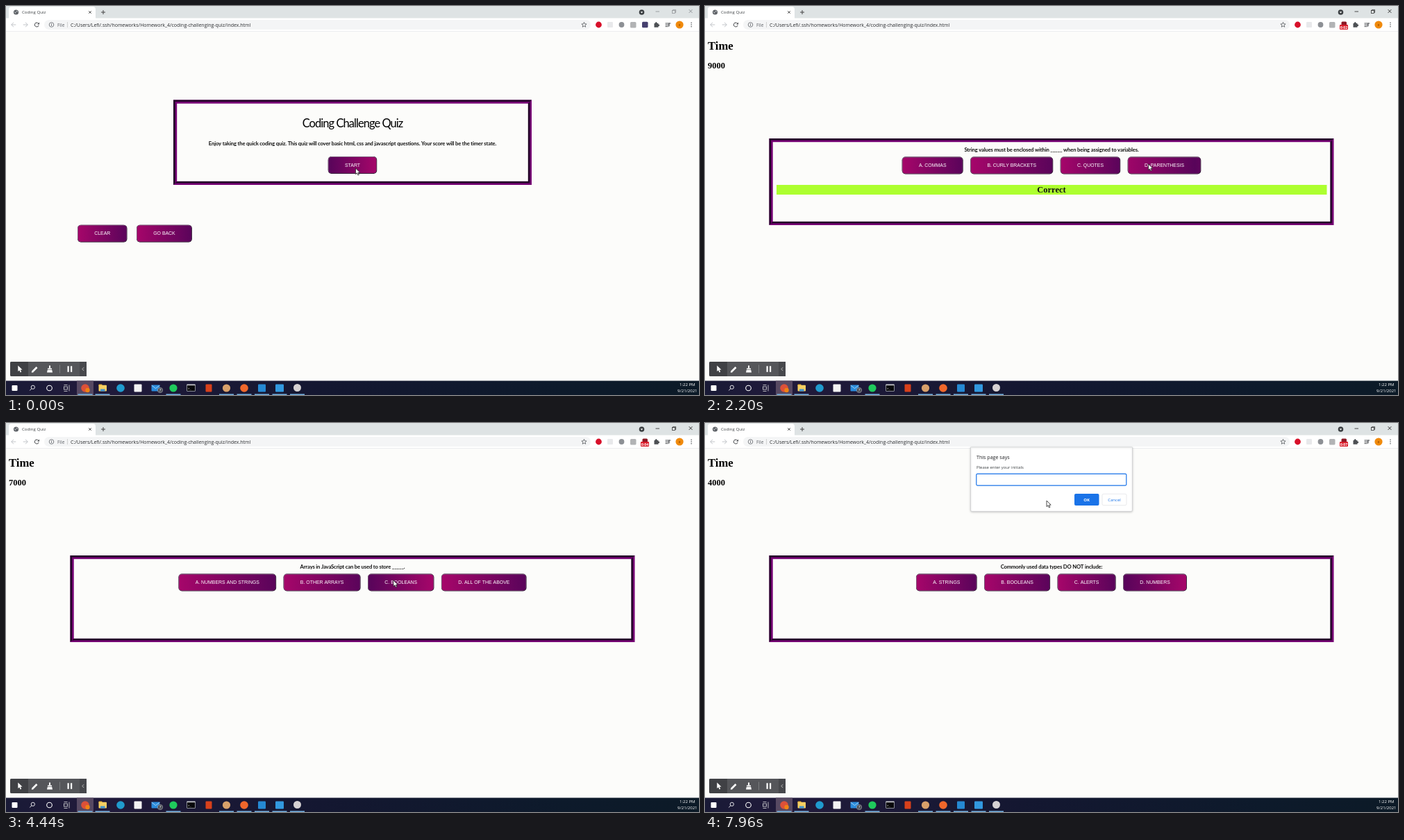
An HTML page with a canvas for the animation above (8000 ms loop, 998 px wide and 561 px high).

```html
<!DOCTYPE html>
<html lang="en">
<head>
<meta charset="utf-8">
<title>Coding Quiz</title>
<style>
html, body { margin: 0; width: 100%; height: 100%; overflow: hidden; background: #fcfcfa; }
canvas { display: block; }
</style>
</head>
<body>
<canvas id="stage" width="998" height="561"></canvas>
<script>
const ctx = document.getElementById('stage').getContext('2d');
const LOOP = 8000, PAGE = '#fcfcfa', MAGENTA = '#a6066a', PLUM = '#58045a';
const UI = '"Open Sans", sans-serif', SERIF = '"Liberation Serif", serif';
const BUTTON_FONT = '6.93px "Liberation Sans", sans-serif';
const START = 780, PROMPT = 7360, FOCUS = 160;

const screens = [
  { from: -1000 },
  { from: START, ask: 'Inside which HTML element do we put the JavaScript?',
    options: ['A. <JS>', 'B. <JAVASCRIPT>', 'C. <SCRIPTING>', 'D. <SCRIPT>'] },
  { from: 2100, ask: 'String values must be enclosed within _____ when being assigned to variables.',
    options: ['A. COMMAS', 'B. CURLY BRACKETS', 'C. QUOTES', 'D. PARENTHESIS'], correct: true },
  { from: 3880, ask: 'Arrays in JavaScript can be used to store _____.',
    options: ['A. NUMBERS AND STRINGS', 'B. OTHER ARRAYS', 'C. BOOLEANS', 'D. ALL OF THE ABOVE'] },
  { from: 6600, ask: 'Commonly used data types DO NOT include:',
    options: ['A. STRINGS', 'B. BOOLEANS', 'C. ALERTS', 'D. NUMBERS'] }
];

// Pointer stops: time, x, y
const path = [
  [0, 503.5, 234], [960, 503.5, 234], [1560, 640, 229], [1800, 638.5, 228],
  [2320, 638.5, 228], [2950, 470, 230], [3200, 462, 231], [3500, 462, 231],
  [3800, 556, 229], [4000, 558, 227], [4600, 558, 227], [5200, 470, 230],
  [5600, 485, 230], [6300, 640, 232], [6500, 630.5, 231], [7400, 630.5, 231],
  [7860, 492, 112], [LOOP, 492, 112]
];

const smooth = k => k * k * (3 - 2 * k);

function pointer(t) {
  const i = path.findIndex(p => p[0] > t);
  if (t < 0) return path[0].slice(1);
  if (i < 0) return path[path.length - 1].slice(1);
  const [t0, x0, y0] = path[i - 1], [t1, x1, y1] = path[i];
  const k = smooth((t - t0) / (t1 - t0));
  return [x0 + (x1 - x0) * k, y0 + (y1 - y0) * k];
}

function rect(x, y, w, h, fill) {
  ctx.fillStyle = fill;
  ctx.fillRect(x, y, w, h);
}

function round(x, y, w, h, r, fill, line, lw = 1) {
  ctx.beginPath();
  ctx.roundRect(x, y, w, h, r);
  if (fill) { ctx.fillStyle = fill; ctx.fill(); }
  if (line) { ctx.strokeStyle = line; ctx.lineWidth = lw; ctx.stroke(); }
}

function disc(x, y, r, fill, line, lw = 1) {
  round(x - r, y - r, 2 * r, 2 * r, r, fill, line, lw);
}

function shape(points, fill, line, lw = 1) {
  ctx.beginPath();
  for (let i = 0; i < points.length; i += 2) ctx.lineTo(points[i], points[i + 1]);
  if (fill) { ctx.closePath(); ctx.fillStyle = fill; ctx.fill(); }
  if (line) { ctx.strokeStyle = line; ctx.lineWidth = lw; ctx.stroke(); }
}

function text(str, x, y, font, color, align = 'left', spacing = 0) {
  ctx.font = font;
  ctx.letterSpacing = spacing + 'px';
  ctx.textAlign = align;
  ctx.fillStyle = color;
  ctx.fillText(str, x, y);
  ctx.letterSpacing = '0px';
}

function bevel(x, y, w, h, b, topLeft, bottomRight) {
  rect(x, y, w, h, bottomRight);
  shape([x, y, x + w, y, x + w - b, y + b, x + b, y + h - b, x, y + h], topLeft);
}

function groove(x, y, w, h) {
  const b = 2.6, dark = '#220427', light = '#750073';
  bevel(x, y, w, h, b, dark, light);
  bevel(x + b, y + b, w - 2 * b, h - 2 * b, b, light, dark);
  rect(x + 2 * b, y + 2 * b, w - 4 * b, h - 4 * b, PAGE);
}

function layout(screen) {
  const box = (label, x, y) => ({ label, x, y, w: ctx.measureText(label).width + 48.4, h: 25 });
  ctx.font = BUTTON_FONT;
  if (!screen.options) {
    const start = box('START', 0, 217);
    start.x = 499 - start.w / 2;
    return [start, box('CLEAR', 103, 315.7), box('GO BACK', 188, 315.7)];
  }
  const row = screen.options.map(o => box(o, 0, 217.5)), gap = 10.5;
  let x = 499 - (row.reduce((sum, b) => sum + b.w, 0) + gap * (row.length - 1)) / 2;
  for (const b of row) { b.x = x; x += b.w + gap; }
  return row;
}

// Progress of the half-second hover fade, replayed from when the button appeared
function hover(b, from, t) {
  let p = 0;
  for (let u = from; u < t; u += 20) {
    const [x, y] = pointer(u);
    const inside = x > b.x && x < b.x + b.w && y > b.y && y < b.y + b.h;
    p = Math.min(1, Math.max(0, p + (inside ? 0.04 : -0.04)));
  }
  return smooth(p);
}

function button(b, p) {
  const left = b.x - b.w * p, g = ctx.createLinearGradient(left, 0, left + 2 * b.w, 0);
  g.addColorStop(0, MAGENTA);
  g.addColorStop(0.51, PLUM);
  g.addColorStop(1, MAGENTA);
  round(b.x, b.y, b.w, b.h, 5, '#241029');
  round(b.x, b.y, b.w - 0.7, b.h - 0.7, 5, '#7d5f7c');
  round(b.x + 0.9, b.y + 0.9, b.w - 1.9, b.h - 1.9, 4, g);
  text(b.label, b.x + b.w / 2, b.y + 14.7, BUTTON_FONT, '#fff', 'center');
}

function question(str, y) {
  text(str, 499, y, '700 7.7px Lato, sans-serif', '#111', 'center', -0.17);
}

function page(t) {
  const now = Math.min(t, PROMPT);
  const screen = screens.filter(s => s.from <= now).pop();
  rect(0, 36, 998, 505, PAGE);
  if (screen.ask) {
    const ticks = Math.floor((now - START) / 1000);
    text('Time', 4, 63, '700 16.64px ' + SERIF, '#000');
    text(ticks ? String(10000 - ticks * 1000) : '0', 4, 89.5, '700 12.48px ' + SERIF, '#000');
    groove(92.5, 191, 813, 125);
    question(screen.ask, 209.5);
    if (screen.correct) {
      rect(103, 258, 792.5, 14, '#adff2f');
      text('Correct', 499, 269, '700 12.48px ' + SERIF, '#111', 'center');
    }
  } else {
    groove(241, 135.5, 516, 122.5);
    text('Coding Challenge Quiz', 499, 174.5, '16.5px Lato, cursive', '#000', 'center', -0.95);
    question('Enjoy taking the quick coding quiz. This quiz will cover basic html, css and javascript questions. Your score will be the timer state.', 200.5);
  }
  for (const b of layout(screen)) button(b, hover(b, screen.from, now));
}

function browser(t) {
  const grey = '#5f6368', control = t < FOCUS ? '#8a8d91' : '#222';
  rect(0, 0, 998, 18, '#dee3e4');
  round(4, 1, 125, 20, [4, 4, 0, 0], '#fff');
  rect(0, 17.5, 998, 18.5, '#fff');
  rect(0, 36, 998, 0.6, '#e3e5e8');
  disc(14.5, 9, 3.6, grey);
  shape([12, 8, 14, 9, 13.5, 11], '#dfe1e4');
  shape([15, 6.5, 17, 8, 15.5, 9], '#dfe1e4');
  text('Coding Quiz', 23, 11.2, '6.1px ' + UI, '#3c4043');
  cross(121, 9, 1.8, '#444');
  shape([137, 9, 143, 9], null, '#444');
  shape([140, 6, 140, 12], null, '#444');
  disc(915.5, 9, 3.8, '#3c4043');
  shape([913.7, 8.2, 917.3, 8.2, 915.5, 10.5], '#fff');
  shape([935.5, 8, 941, 8], null, control, 0.8);
  ctx.strokeStyle = control;
  ctx.lineWidth = 0.7;
  ctx.strokeRect(959.5, 6.5, 4, 4);
  shape([960.5, 6.3, 960.5, 5.4, 964.6, 5.4, 964.6, 9.4, 963.8, 9.4], null, control, 0.7);
  cross(986, 7.5, 2.4, control);

  arrow(11, -1);
  arrow(28, 1);
  ctx.beginPath();
  ctx.arc(44.3, 27, 3, 0.3, 5.4);
  ctx.strokeStyle = '#44474a';
  ctx.lineWidth = 1;
  ctx.stroke();
  shape([45, 26.5, 48, 26.5, 48, 23.5], '#44474a');
  round(55, 20, 787, 14, 7, '#f4f5f6');
  disc(65.5, 27, 3.3, null, grey, 0.8);
  rect(65.1, 26.4, 0.9, 2.4, grey);
  rect(65.1, 24.9, 0.9, 0.9, grey);
  text('File', 74, 29.5, '6.5px ' + UI, grey);
  rect(88.3, 23, 0.6, 8, '#bbb');
  text('C:/Users/Lefi/.ssh/homeworks/Homework_4/coding-challenging-quiz/index.html',
    93, 29.5, '6.97px ' + UI, '#2b2d30');

  const star = [];
  for (let i = 0; i <= 10; i++) {
    const a = i * Math.PI / 5 - Math.PI / 2, r = i % 2 ? 1.7 : 3.8;
    star.push(832.5 + r * Math.cos(a), 27.2 + r * Math.sin(a));
  }
  shape(star, null, '#55585c', 0.8);
  disc(853.5, 27, 4.4, '#d8102a');
  round(866, 23, 8, 8, 1, '#e8e9eb');
  disc(886.5, 27, 3.9, '#8d9095');
  round(899, 23, 8.5, 8.5, 1.5, '#b2b3b5');
  if (t < FOCUS) {
    round(916, 22.8, 8.5, 8.5, 1.5, '#46406f');
  } else {
    round(916.5, 22.5, 7.5, 6, 1.5, '#8b1825');
    round(914, 27, 12, 7, 1, '#d91c2a');
    const sec = Math.floor((t - FOCUS) / 1000);
    text('0:0' + sec, 920, 32.6, '700 5.2px ' + UI, '#fff', 'center');
  }
  round(933.5, 25, 6, 5.8, 0.6, '#4d5054');
  disc(936.3, 24.6, 1.4, '#4d5054');
  disc(939.8, 27.8, 1.4, '#4d5054');
  for (const y of [24.5, 26.8, 29.1]) rect(949.5, y, y > 28 ? 4 : 6.5, 1, '#4d5054');
  shape([954.7, 30, 954.7, 25, 957.4, 25], null, '#4d5054', 0.9);
  disc(970, 27, 5.6, '#f08a0c');
  text('x', 970, 28.8, '5.5px ' + UI, '#6b3500', 'center');
  for (const y of [24.2, 27, 29.8]) disc(987, y, 0.8, '#4d5054');
}

function cross(x, y, r, color) {
  shape([x - r, y - r, x + r, y + r], null, color, 0.9);
  shape([x - r, y + r, x + r, y - r], null, color, 0.9);
}

function arrow(x, dir) {
  shape([x - 3.3 * dir, 27, x + 3.3 * dir, 27], null, '#bcbfc3', 0.9);
  shape([x, 23.8, x + 3.3 * dir, 27, x, 30.2], null, '#bcbfc3', 0.9);
}

function recorder() {
  round(6, 513, 110, 21, 2, '#55565a');
  round(6, 513, 26, 21, [2, 0, 0, 2], '#404145');
  rect(106, 513, 10, 21, '#47484c');
  arrowhead(17.3, 518.5, '#fff', null);
  shape([38.5, 527, 44.5, 521], null, '#fff', 2.6);
  shape([36.8, 528.7, 37.4, 525.8, 39.8, 528.2], '#fff');
  rect(62, 518.5, 2, 4, '#fff');
  rect(60, 522.5, 6, 1.6, '#fff');
  shape([59.8, 524.7, 66.2, 524.7, 67, 528.5, 59, 528.5], '#fff');
  rect(77, 517.5, 0.7, 12, '#8c8d90');
  rect(88.5, 519.3, 2.2, 8.5, '#fff');
  rect(93, 519.3, 2.2, 8.5, '#fff');
  shape([112, 521.3, 109.9, 523.6, 112, 525.9], null, '#ddd', 0.8);
}

function taskbar() {
  const g = ctx.createLinearGradient(0, 0, 998, 0), y = 551;
  g.addColorStop(0, '#191a36');
  g.addColorStop(0.12, '#211a3b');
  g.addColorStop(0.45, '#141731');
  g.addColorStop(0.8, '#0d1a2b');
  g.addColorStop(1, '#0c1a27');
  rect(0, 540.5, 998, 20.5, g);
  rect(102, 540.5, 24, 20.5, '#574962');
  const tile = (x, fill, w = 10, h = w) => round(x - w / 2, y - h / 2, w, h, 1, fill);
  tile(12.5, '#fff', 8);
  disc(38.8, 549.8, 2.6, null, '#fff', 0.9);
  shape([36.8, 551.8, 34.3, 554.5], null, '#fff', 0.9);
  disc(62.5, y, 3.8, null, '#fff', 1.1);
  ctx.strokeStyle = '#ddd';
  ctx.lineWidth = 0.8;
  ctx.strokeRect(83.5, 549, 5, 4);
  shape([83.5, 546.5, 88.5, 546.5], null, '#ddd', 0.8);
  shape([83.5, 555.5, 88.5, 555.5], null, '#ddd', 0.8);
  shape([91, 546.5, 91, 555.5], null, '#ddd', 0.8);
  disc(114, y, 5.8, '#dc5139');
  disc(117.5, 554, 3.2, '#ef8214');
  round(133.5, 545.5, 5, 3, 0.8, '#e2a92e');
  round(133.5, 546.8, 11.5, 8.7, 0.8, '#f6cf62');
  rect(136, 552.5, 6.5, 3, '#3f94d2');
  disc(165, y, 5.8, '#209bce');
  tile(190, '#f3f3f3', 11);
  tile(215.5, '#2a8bdc', 12, 9);
  shape([209.7, 547, 215.5, 551.5, 221.3, 547], null, '#c8e6fa', 0.8);
  disc(222, 554, 3.7, '#4a4d56', '#c4c6cc', 0.5);
  text('7', 222, 556, '5.2px ' + UI, '#fff', 'center');
  disc(241, y, 5.6, '#1fca5c');
  round(260.5, 546, 12, 9.5, 0.5, '#08080b', '#a9abb1', 0.8);
  rect(260.5, 545.7, 12, 1.5, '#c6c7cb');
  text('>_', 262, 552.5, '4px "DejaVu Sans Mono", monospace', '#fff');
  tile(292, '#d8401b', 9, 11);
  disc(317.5, y, 5.6, '#d8a06a');
  disc(343, y, 5.8, '#f0672b');
  tile(368.5, '#2589d3', 11);
  tile(394, '#3299df', 12, 11);
  disc(419.5, 550.5, 5.5, '#d6d2d3');
  for (const x of [114, 139, 241, 317.5, 343, 368.5, 394, 419.5])
    rect(x - 10.5, 559.5, 21, 1.5, '#76b4e4');
  text('1:22 PM', 981.3, 548, '6px ' + UI, '#fff', 'center');
  text('9/21/2021', 981.3, 557.3, '6px ' + UI, '#fff', 'center');
}

function dialog() {
  const blue = '#1a73e8';
  ctx.save();
  ctx.shadowColor = 'rgba(0,0,0,.22)';
  ctx.shadowBlur = 3;
  ctx.shadowOffsetY = 0.8;
  round(382.5, 35, 233, 92.5, [0, 0, 2, 2], '#fff', '#c8c9cc', 0.6);
  ctx.restore();
  text('This page says', 391, 52, '7.1px ' + UI, '#202124');
  text('Please enter your initials', 391, 66.2, '5.95px ' + UI, '#3c4043');
  round(390.8, 73.3, 216, 16.8, 1.5, '#fff', blue, 1.2);
  round(532, 102, 35.5, 17, 2, blue);
  text('OK', 549.7, 112.7, '700 6px ' + UI, '#fff', 'center');
  round(572, 102.3, 35, 16.4, 2, '#fff', '#dadce0', 0.6);
  text('Cancel', 589.5, 112.7, '6px ' + UI, blue, 'center');
}

function arrowhead(x, y, fill, line) {
  const d = [0, 0, 0, 8.6, 2, 6.8, 3.4, 10, 4.9, 9.3, 3.5, 6.3, 6.2, 6.1, 0, 0];
  shape(d.map((v, i) => v + (i % 2 ? y : x)), fill, line, 0.8);
}

function draw(t) {
  page(t);
  browser(t);
  if (t >= PROMPT) dialog();
  recorder();
  taskbar();
  arrowhead(...pointer(t), '#fff', '#222');
}

let begin;
function frame(now) {
  begin ??= now;
  draw((now - begin) % LOOP);
  requestAnimationFrame(frame);
}
draw(0);
requestAnimationFrame(frame);
</script>
</body>
</html>
```
